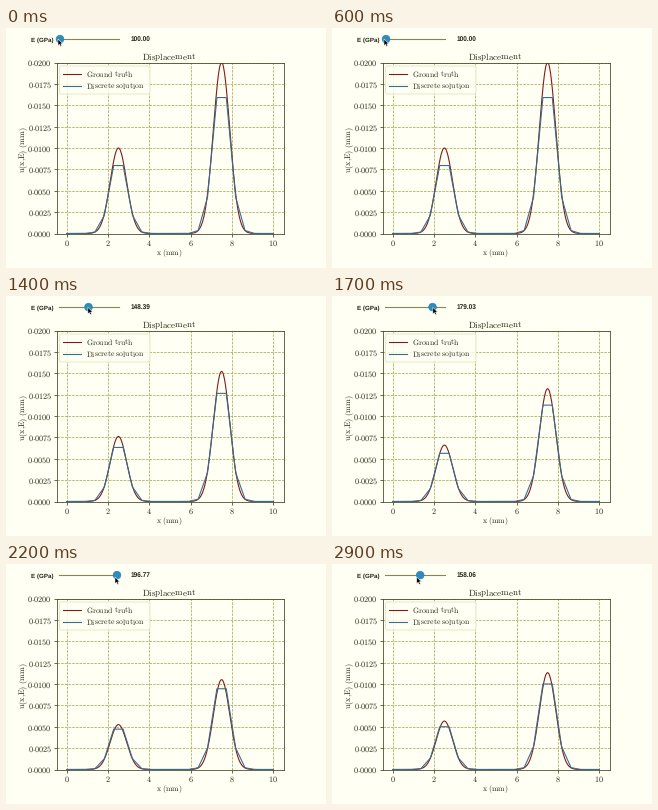
Recreate the animation shown at these times as a matplotlib script. Size 320 px wide and 240 px high, loop 3 s.

```python
import matplotlib.pyplot as plt
import numpy as np
from matplotlib.animation import FuncAnimation
from matplotlib.patches import Circle, FancyBboxPatch, Polygon

W, H, DPI = 320, 240, 80
FRAMES, INTERVAL = 30, 100
PX = 72 / DPI  # points per pixel

PAPER, INK, GRID = "#fffff3", "#2b2b18", "#acac5c"
RED, BLUE, KNOB = "#851818", "#33708f", "#2b8cbe"

plt.rcParams["mathtext.fontset"] = "cm"
plt.rcParams["text.hinting"] = "none"

# Slider value over time (s); the curves follow after a short delay.
TIMES = [0.6, 0.85, 1.1, 1.45, 1.7, 1.95, 2.2, 2.35, 2.6, 2.9]
VALUES = [100, 101.6, 128.23, 151.6, 179.03, 190.3, 196.77, 194.4, 179.84, 158.06]
STEP, DELAY = 100 / 124, 0.25
POINTER_T = [0.6, 1.1, 1.7, 2.2, 2.6, 2.9]
POINTER_DX = [-2, -1.5, 0.3, -2, -3.8, -3.5]
POINTER_Y = [11, 11.2, 11.3, 13, 12, 13]


def modulus(t):
    raw = np.interp(t, TIMES, VALUES)
    return 100 + STEP * round((raw - 100) / STEP)


def exact(x, e):
    bump = lambda c: np.exp(-np.pi * (x - c) ** 2)
    return (bump(2.5) + 2 * bump(7.5)) / e


nodes = np.linspace(0, 10, 23)


def discrete(e):
    """Flat top, shoulder and foot around each peak; the error shrinks with e."""
    top = 0.795 + 0.00115 * (e - 100)

    def bump(c):
        d = np.abs(nodes - c)
        return np.interp(d, nodes[:4] + nodes[1] / 2, [1, 0.267, 0.022, 0])
    return top * (bump(2.5) + 2 * bump(7.5)) / e


def roman(s):
    return r"$\mathrm{%s}$" % s.replace(" ", r"\ ").replace(",", "{,}")


fig = plt.figure(figsize=(W / DPI, H / DPI), dpi=DPI, facecolor=PAPER)

# Plot
L, R, T, B = 50.5, 277.5, 34.5, 205.5
ax = fig.add_axes([L / W, 1 - B / H, (R - L) / W, (B - T) / H], facecolor=PAPER)
ax.set(xlim=(-0.5, 10.5), ylim=(0, 0.02))
xt, yt = np.arange(0, 11, 2), np.arange(9) * 0.0025
ax.set_xticks(xt, [f"${v}$" for v in xt])
ax.set_yticks(yt, [f"${v:.4f}$" for v in yt])
ax.tick_params(length=2.6 * PX, width=0.7 * PX, pad=2 * PX, color=INK,
               labelcolor=INK, labelsize=8.2 * PX)
ax.grid(color=GRID, lw=0.8 * PX, ls=(0, (3.2, 1.4)))
ax.set_axisbelow(True)
for side in ax.spines.values():
    side.set(color="#45452a", linewidth=0.8 * PX)

xs = np.linspace(0, 10, 400)
truth, = ax.plot(xs, exact(xs, 100), color=RED, lw=1.1 * PX)
approx, = ax.plot(nodes, discrete(100), color=BLUE, lw=1.1 * PX)

# Pixel layer, y pointing down
ui = fig.add_axes([0, 0, 1, 1])
ui.set(xlim=(0, W), ylim=(H, 0))
ui.axis("off")


def label(x, y, s, size, **kw):
    kw = {"va": "baseline", "color": INK, **kw}
    return ui.text(x, y, s, fontsize=size * PX, **kw)


label(162.8, 31, roman("Displacement"), 9, ha="center")
label(163.5, 227, roman("x (mm)"), 7.8, ha="center")
label(17.8, 121.5, roman("u(x,E) (mm)"), 8.2, ha="center", va="center", rotation=90)

# Legend
ui.add_patch(FancyBboxPatch((55, 39.5), 87.5, 25, boxstyle="round,pad=1.5",
                            fc=PAPER, ec="#dedeb8", lw=0.8 * PX, alpha=0.85))
for y, color, name in ((46, RED, "Ground truth"), (58, BLUE, "Discrete solution")):
    ui.plot([57, 75], [y, y], color=color, lw=1.1 * PX)
    label(80.4, y + 2.6, roman(name), 7.75)

# Slider
sans = dict(family="Liberation Sans", weight="bold", color="#222218")
label(25, 13.4, "E (GPa)", 6.2, **sans)
readout = label(125, 13.4, "", 6.5, **sans)
ui.plot([53, 112.5], [11.3, 11.3], color="#85855a", lw=1.1 * PX)
knob = Circle((54, 11.1), 3.9, fc=KNOB, ec="#2478a5", lw=0.5 * PX, zorder=4)
ui.add_patch(knob)
ARROW = np.array([(0, 0), (0, 7), (1.6, 5.6), (2.7, 7.9), (3.9, 7.3),
                  (2.9, 5.1), (5, 5)]) * 0.95
pointer = Polygon(ARROW, fc="black", ec="white", lw=0.5 * PX, zorder=5)
ui.add_patch(pointer)


def update(i):
    t = i * INTERVAL / 1000
    e, shown = modulus(t), modulus(t - DELAY)
    truth.set_ydata(exact(xs, shown))
    approx.set_ydata(discrete(shown))
    readout.set_text(f"{e:.2f}")
    x = 54 + 0.589 * (e - 100)
    knob.center = x, 11.1
    tip = (x + np.interp(t, POINTER_T, POINTER_DX),
           np.interp(t, POINTER_T, POINTER_Y))
    pointer.set_xy(ARROW + tip)
    return truth, approx, readout, knob, pointer


anim = FuncAnimation(fig, update, frames=FRAMES, interval=INTERVAL,
                     repeat=True, repeat_delay=0, blit=False)
plt.show()
```
